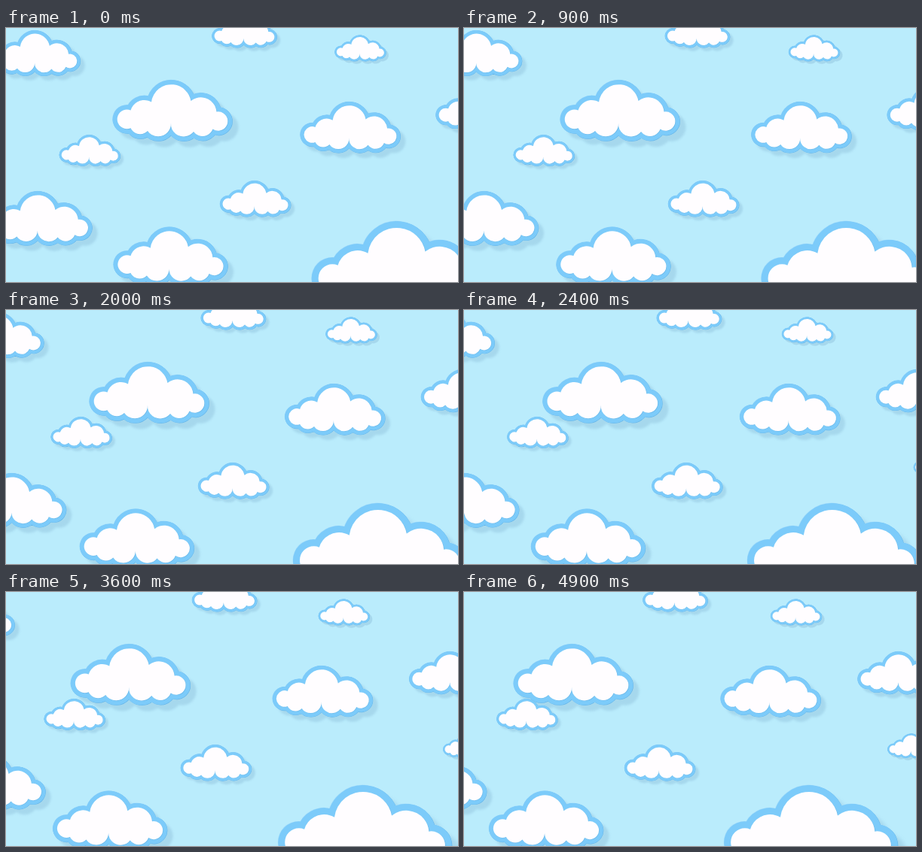
Animation of 600x338 px, one loop 5 s. Source, as an HTML page with a canvas:

```html
<!DOCTYPE html>
<html lang="en">
<head>
<meta charset="utf-8">
<title>Drifting clouds</title>
<style>
html, body { margin: 0; width: 100%; height: 100%; overflow: hidden; background: #baecfc; }
canvas { display: block; }
</style>
</head>
<body>
<canvas id="sky" width="600" height="338"></canvas>
<script>
const ctx = document.getElementById('sky').getContext('2d');
const LOOP = 5000, STEP = 100, RIM = 6.1;

// Notches between the puffs, clockwise, on a cloud 160 units wide
const notches = [
  [24.5, 40.5], [52, 29.5], [104.5, 28], [138.5, 42.5], [133.5, 65.5],
  [108, 69], [78, 57.5], [47, 68], [24.5, 64.3]
];

// left, top, scale, speed in px/s
const clouds = [
  [-20, 3, 0.745, 24.2],
  [273, -18, 0.544, 7.35],
  [436, 9.3, 0.43, 6],
  [141, 69, 1, 15.5],
  [390, 98, 0.838, 10.2],
  [570, 79, 0.7, 9.8],
  [70.3, 142, 0.512, 5.6],
  [283.5, 203, 0.594, 14.5],
  [629.6, 188.3, 0.4, 13.8],
  [-27.5, 217, 0.89, 17.2],
  [142, 264.5, 0.956, 22.35],
  [405, 257, 1.45, 12.35]
];

// Longer spans swell more; the ends are fullest, the underside rounder than the top
function swell(dx, dy) {
  const k = Math.abs(dy) > Math.abs(dx) ? 0.0315 : dx > 0 ? 0.0082 : 0.0115;
  return k * (dx * dx + dy * dy);
}

function makeCloud() {
  const path = new Path2D();
  notches.forEach(([x0, y0], i) => {
    const [x1, y1] = notches[(i + 1) % notches.length];
    const dx = x1 - x0, dy = y1 - y0, len = Math.hypot(dx, dy);
    const rise = swell(dx, dy);
    const r = (len * len / 4 + rise * rise) / (2 * rise);
    const cx = (x0 + x1) / 2 - dy / len * (r - rise);
    const cy = (y0 + y1) / 2 + dx / len * (r - rise);
    path.arc(cx, cy, r, Math.atan2(y0 - cy, x0 - cx), Math.atan2(y1 - cy, x1 - cx));
  });
  path.closePath();
  return path;
}

const shape = makeCloud();

function layer(kind, color, shift) {
  ctx[kind + 'Style'] = color;
  ctx.translate(shift, shift);
  ctx[kind](shape);
  ctx.translate(-shift, -shift);
}

function drawCloud(x, y, s) {
  ctx.save();
  ctx.translate(x, y);
  ctx.scale(s, s);
  ctx.lineJoin = 'round';
  ctx.lineWidth = RIM * 2;
  ctx.filter = `blur(${1.8 * s}px)`;
  layer('stroke', 'rgba(105, 155, 190, 0.24)', 8);
  ctx.filter = 'none';
  layer('stroke', '#a2dcfb', -0.3);
  layer('stroke', '#62b2e6', 0.4);
  layer('stroke', '#7ccbfa', 0);
  layer('fill', '#6cb9ea', 0.6);
  layer('fill', '#fffdff', 0);
  ctx.restore();
}

function draw(ms) {
  const t = Math.floor((ms % LOOP) / STEP) * STEP / 1000;
  ctx.fillStyle = '#baecfc';
  ctx.fillRect(0, 0, 600, 338);
  for (const [x, y, s, v] of clouds) drawCloud(x - v * t, y, s);
}

const start = performance.now();
function tick() {
  draw(performance.now() - start);
  requestAnimationFrame(tick);
}
tick();
</script>
</body>
</html>
```
